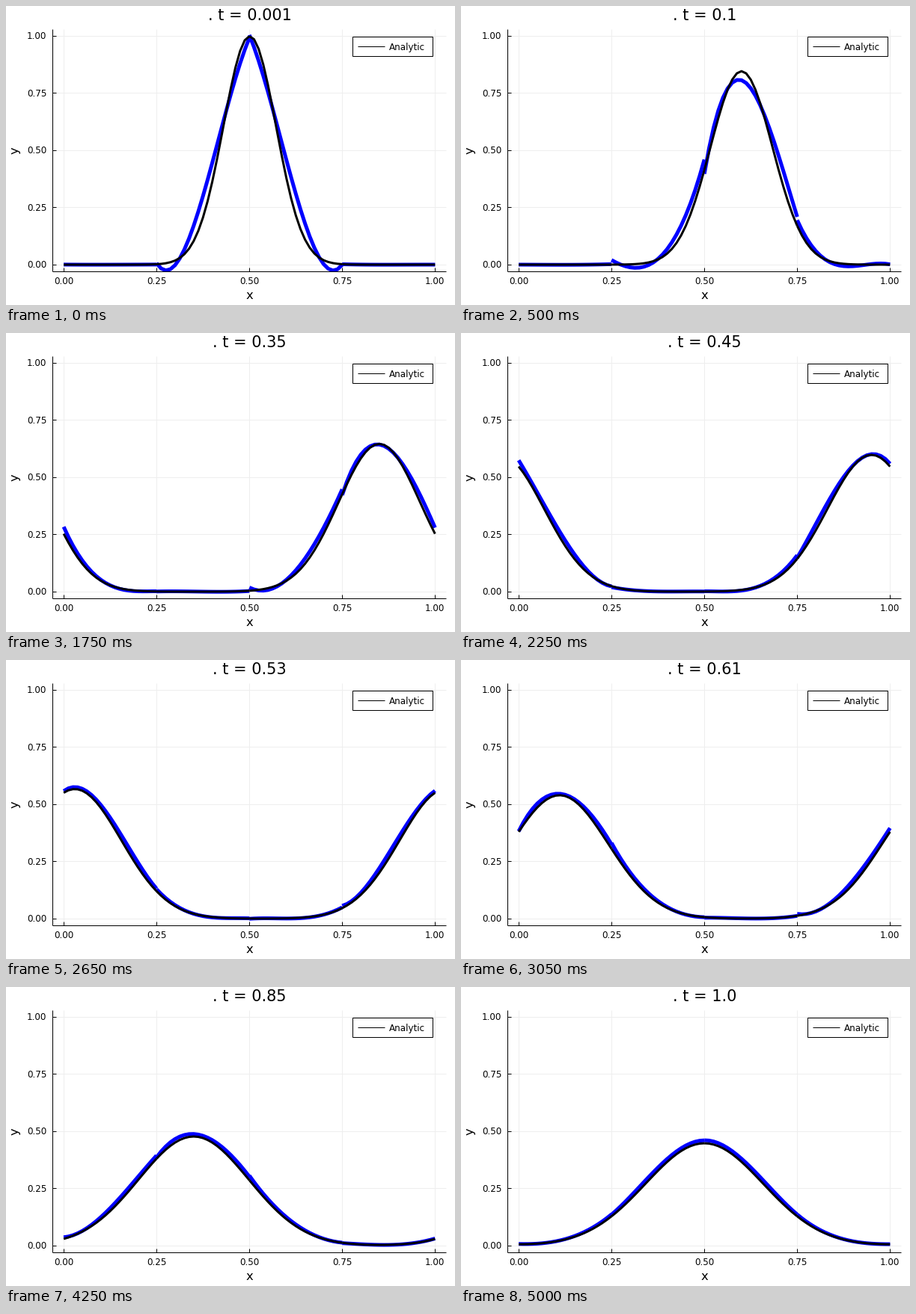
Animation, 600 px wide and 400 px high, one loop 5.05 s. Source, as a matplotlib script:

```python
import numpy as np
import matplotlib.pyplot as plt
from matplotlib.animation import FuncAnimation
from matplotlib.patches import Rectangle
from numpy.polynomial import legendre

W, H, DPI = 600, 400, 100
PT = 72 / DPI                      # points per pixel
FRAMES, INTERVAL = 101, 50

# Advection-diffusion of a Gaussian on a periodic unit interval
CELLS, ORDER = 4, 3
SPEED, NU, X0, VAR = 1.0, 0.01, 0.5, 0.01
SIZE = 1 / CELLS
DT = 0.001


def analytic(x, t):
    spread = 1 + 4 * NU * t / VAR
    return sum(np.exp(-(x - X0 - SPEED * t + k) ** 2 / (VAR * spread))
               for k in (-1, 0, 1, 2)) / np.sqrt(spread)


def derivative(bias):
    """Discontinuous Galerkin d/dx; bias 1 takes the left trace, 0 the right."""
    n = np.arange(ORDER + 1)
    right, left = np.ones(ORDER + 1), (-1.0) ** n
    gap = n[:, None] - n[None, :]
    stiff = np.where((gap > 0) & (gap % 2 == 1), 2.0, 0.0)
    inv_mass = np.diag((2 * n + 1) / SIZE)
    own = bias * np.outer(right, right) - (1 - bias) * np.outer(left, left) - stiff
    after = (1 - bias) * np.outer(right, left)
    before = -bias * np.outer(left, right)
    eye = np.eye(CELLS)
    return (np.kron(eye, inv_mass @ own)
            + np.kron(np.roll(eye, 1, axis=1), inv_mass @ after)
            + np.kron(np.roll(eye, -1, axis=1), inv_mass @ before))


def step_matrix():
    """One Runge-Kutta step with upwind advection and alternating diffusion."""
    upwind, downwind = derivative(1.0), derivative(0.0)
    a = DT * (NU * downwind @ upwind - SPEED * upwind)
    eye = np.eye(len(a))
    return eye + a @ (eye + a @ (eye + a @ (eye + a / 4) / 3) / 2)


def cell_points(xi):
    return (np.arange(CELLS)[:, None] + (xi + 1) / 2) * SIZE


nodes = -np.cos(np.pi * np.arange(ORDER + 1) / ORDER)
start = np.linalg.solve(legendre.legvander(nodes, ORDER),
                        analytic(cell_points(nodes), 0).T).T.ravel()
STEP = step_matrix()
XI = np.linspace(-1, 1, 21)
BASIS = legendre.legvander(XI, ORDER)
XS = cell_points(XI)


def numeric(steps):
    coef = np.linalg.matrix_power(STEP, steps) @ start
    return coef.reshape(CELLS, -1) @ BASIS.T


fig = plt.figure(figsize=(W / DPI, H / DPI), dpi=DPI, facecolor="white")
LEFT, RIGHT, TOP, BOTTOM = 62.2, 588.2, 30.6, 355.2
ax = fig.add_axes([LEFT / W, 1 - BOTTOM / H, (RIGHT - LEFT) / W, (BOTTOM - TOP) / H])
ax.set(xlim=(-0.03, 1.03), ylim=(-0.03, 1.03))
ax.axis("off")
page = fig.add_axes([0, 0, 1, 1], zorder=-1)
top = fig.add_axes([0, 0, 1, 1], zorder=2)
for layer in (page, top):
    layer.set(xlim=(0, W), ylim=(H, 0))
    layer.axis("off")


def rule(layer, xs, ys, color="black", width=1.0):
    layer.plot(xs, ys, color=color, lw=width * PT, solid_capstyle="butt")


def label(x, y, text, px, ha="center", va="baseline", **kw):
    return top.text(x, y, text, fontsize=px * PT, family="DejaVu Sans",
                    ha=ha, va=va, **kw)


def px_x(v):
    return LEFT + (v + 0.03) / 1.06 * (RIGHT - LEFT)


def px_y(v):
    return BOTTOM - (v + 0.03) / 1.06 * (BOTTOM - TOP)


for v in np.linspace(0, 1, 5):
    x, y = px_x(v), px_y(v)
    rule(page, [x, x], [TOP, BOTTOM], "#eeeeee")
    rule(page, [LEFT, RIGHT], [y, y], "#eeeeee")
    rule(page, [x, x], [BOTTOM, BOTTOM - 5])
    rule(page, [LEFT, LEFT + 5], [y, y])
    label(x, 371.5, f"{v:.2f}", 11.95)
    label(54.4, y + 4.4, f"{v:.2f}", 11.95, ha="right")
rule(page, [LEFT, LEFT], [TOP, BOTTOM])
rule(page, [LEFT, RIGHT], [BOTTOM, BOTTOM])
label(325.2, 392, "x", 16.4)
label(19.5, 193.3, "y", 16.4, ha="right", va="center", rotation=90)

top.add_patch(Rectangle((463.2, 40.9), 107, 26, fc="white", ec="black", lw=PT))
rule(top, [470, 506], [53.9, 53.9])
label(511.5, 59, "Analytic", 11.95, ha="left")
title = label(325.5, 19.4, "", 20.9)


def curves(color, width):
    return [ax.plot([], [], color=color, lw=width * PT, solid_capstyle="butt",
                    solid_joinstyle="round")[0] for _ in range(CELLS)]


blue = curves("#0000ff", 5)
black = curves("#000000", 3)


def draw(frame):
    steps = max(1, 10 * frame)
    t = round(steps * DT, 3)
    title.set_text(f". t = {t}")
    exact, approx = analytic(XS, t), numeric(steps)
    for k in range(CELLS):
        blue[k].set_data(XS[k], approx[k])
        black[k].set_data(XS[k], exact[k])
    return blue + black + [title]


anim = FuncAnimation(fig, draw, frames=FRAMES, interval=INTERVAL,
                     repeat=True, repeat_delay=0)
plt.show()
```
